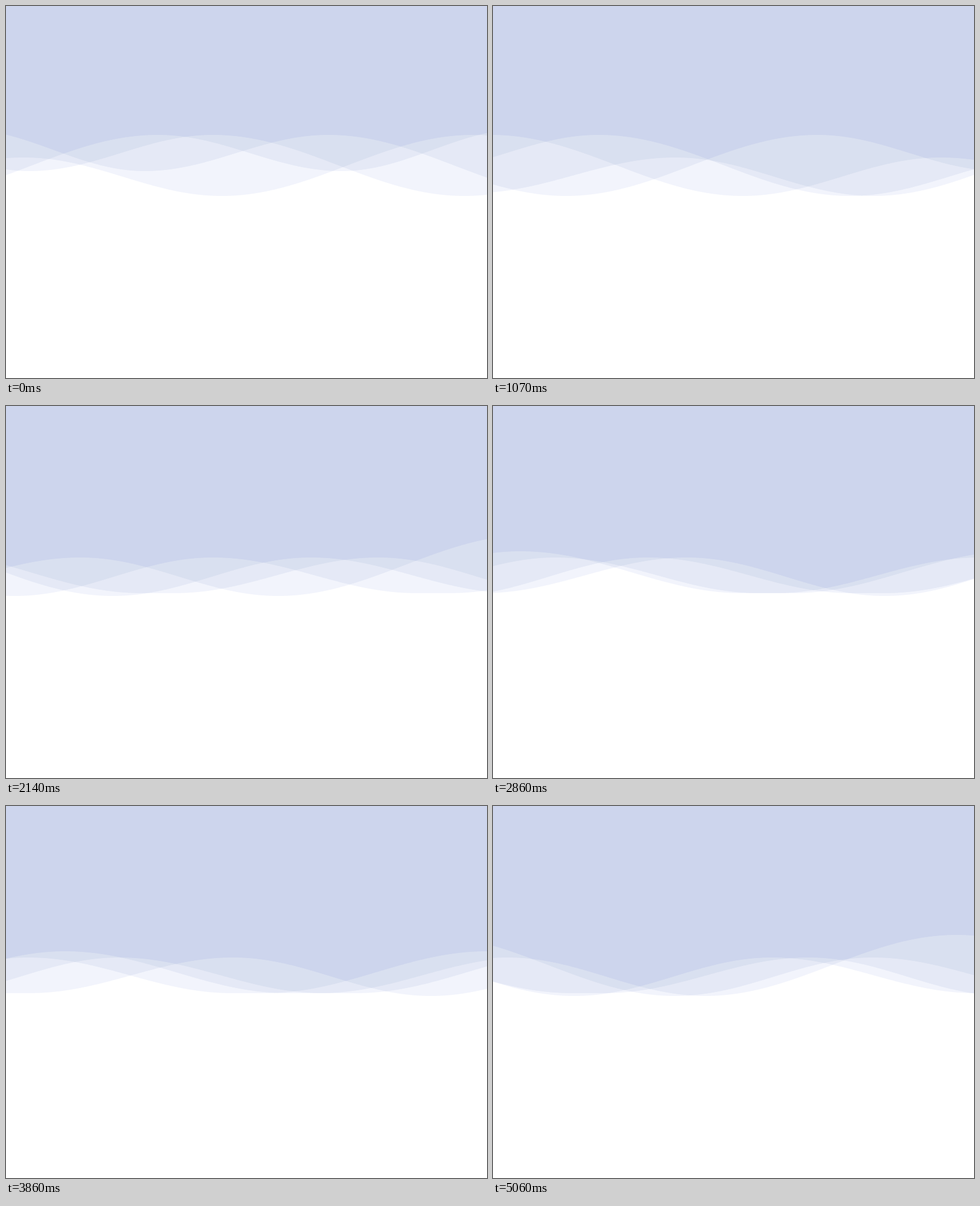
Write an HTML page with a canvas that moves like this. It is 851 px wide and 658 px high and loops after 5.2 s.

```html
<!DOCTYPE html>
<html lang="en">
<head>
<meta charset="utf-8">
<title>Waves</title>
<style>
html, body { margin: 0; width: 100%; height: 100%; overflow: hidden; background: #fff; }
canvas { display: block; }
</style>
</head>
<body>
<canvas id="stage" width="851" height="658"></canvas>
<script>
const ctx = document.getElementById('stage').getContext('2d');
const W = 851, H = 658, LOOP = 5200;
const SLOT = 500 / 7;   // ms per displayed step
const TURN = 45.75;     // step at which the waves reverse

// Crests and troughs of the outline that all waves share
const knots = [
  [-1440, 218], [-1120, 292], [-795, 228], [-350, 336],
  [0, 268], [360, 331], [420, 331], [812, 257], [1160, 320]
];

// Place at the turn, px per step, direction of the outline
const waves = [
  { x: -110, v: 28.4, dir: 1 },
  { x: 45, v: 29.5, dir: 1 },
  { x: 525, v: -23.5, dir: -1 },
  { x: 1034, v: -22.4, dir: -1 }
];

// From one covering wave to all four
const shades = ['#f2f4fc', '#e5e9f6', '#d9e0f0', '#cdd5ed'];

function outline(x) {
  const i = Math.max(1, knots.findIndex(k => k[0] >= x));
  const [x0, y0] = knots[i - 1], [x1, y1] = knots[i];
  return y0 + (y1 - y0) * (1 - Math.cos(Math.PI * (x - x0) / (x1 - x0))) / 2;
}

// The motion rests at first, then about every twentieth slot repeats a step
function stepAt(t) {
  const slot = Math.floor((t + 5) / SLOT);
  return slot < 3 ? 1 : Math.floor(slot * 0.951 + 0.49);
}

function draw(step) {
  const away = Math.abs(step - TURN);
  const columns = Array.from({ length: W + 1 }, (_, x) => waves
    .map(w => outline((x - w.x - w.v * away) * w.dir))
    .sort((a, b) => b - a));

  ctx.clearRect(0, 0, W, H);
  shades.forEach((shade, k) => {
    ctx.fillStyle = shade;
    ctx.beginPath();
    ctx.moveTo(0, 0);
    columns.forEach((ys, x) => ctx.lineTo(x, ys[k]));
    ctx.lineTo(W, 0);
    ctx.fill();
  });
}

function tick() {
  draw(stepAt(performance.now() % LOOP));
  requestAnimationFrame(tick);
}
tick();
</script>
</body>
</html>
```
